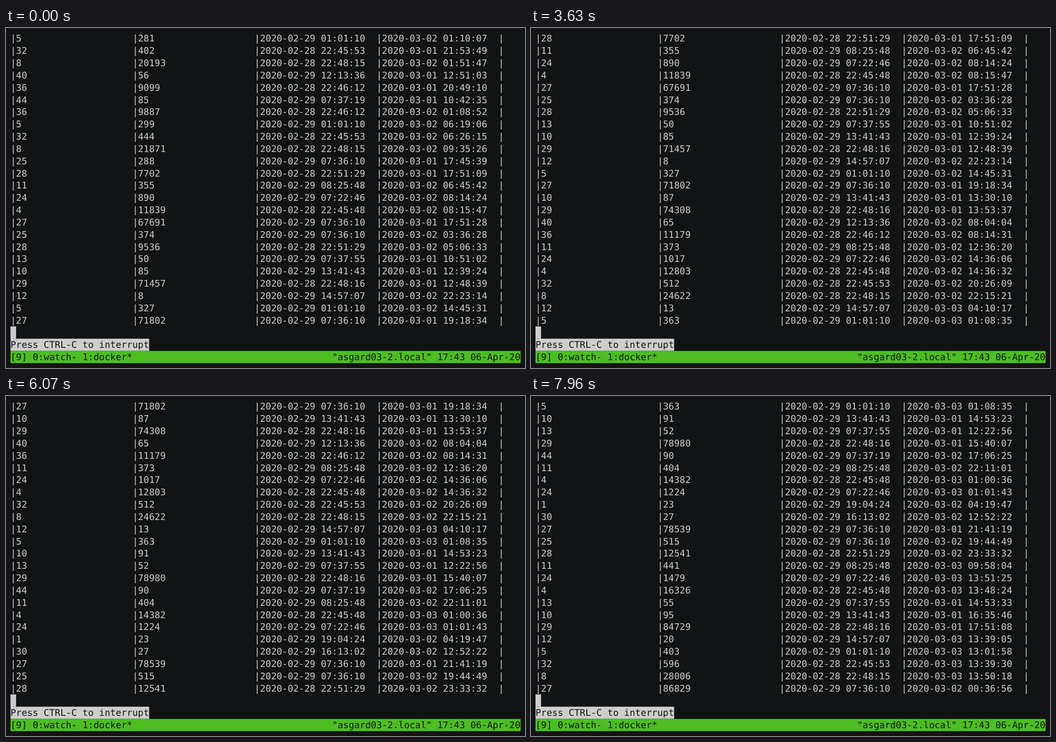
Recreate the animation shown at these times as an HTML page. Size 923 px wide and 606 px high, loop 8000 ms.

```html
<!DOCTYPE html>
<html lang="en">
<head>
<meta charset="utf-8">
<title>Terminal table</title>
<style>
  html, body { margin: 0; width: 100%; height: 100%; overflow: hidden; background: #121314; }
  svg { display: block; }
  text {
    font: 16.377px "DejaVu Sans Mono", "Liberation Mono", monospace;
    text-rendering: geometricPrecision;
    white-space: pre;
    fill: #cdcdca;
  }
  .light { fill: #cdcdcd; }
  .green { fill: #4cbe20; }
  .dark { fill: #121314; }
</style>
</head>
<body>
<svg width="923" height="606" viewBox="0 0 923 606">
  <svg x="0" y="8" width="923" height="524" viewBox="0 8 923 524"><g id="table"></g></svg>
  <g id="footer"></g>
</svg>
<script>
// id: window start in February, first and last count, first and last end in hours of March
const groups = {
  1: ["29 19:04:24", 23, 23, 28.3297, 28.3297],
  4: ["28 22:45:48", 11839, 16326, 32.2631, 61.8067],
  5: ["29 01:01:10", 281, 403, 25.1686, 61.0328],
  8: ["28 22:48:15", 20193, 28006, 25.8631, 61.8383],
  10: ["29 13:41:43", 85, 95, 12.6567, 16.5961],
  11: ["29 08:25:48", 355, 441, 30.7617, 57.9678],
  12: ["29 14:57:07", 8, 20, 46.3872, 61.6514],
  13: ["29 07:37:55", 50, 55, 10.8506, 14.8925],
  24: ["29 07:22:46", 890, 1479, 32.24, 61.8569],
  25: ["29 07:36:10", 288, 515, 17.7608, 43.7469],
  27: ["29 07:36:10", 67691, 86829, 17.8578, 24.6156],
  28: ["28 22:51:29", 7702, 12541, 17.8525, 47.5589],
  29: ["28 22:48:16", 71457, 84729, 12.8108, 17.8522],
  30: ["29 16:13:02", 27, 27, 36.8728, 36.8728],
  32: ["28 22:45:53", 402, 596, 21.8969, 61.6583],
  36: ["28 22:46:12", 9099, 11179, 20.8194, 32.2419],
  40: ["29 12:13:36", 56, 65, 12.8508, 32.0678],
  44: ["29 07:37:19", 85, 90, 10.7097, 41.1069]
};

// ids printed at each time in ms
const batches = {
  0: "5 32 8 40 36 44 36 5 32 8 25 28 11 24 4 27 25 28 13 10 29 12 5 27",
  930: "10 29", 990: "40 36", 1050: "11 24 4", 1110: "32", 1640: "8",
  3100: "12", 3630: "5", 5160: "10 13 29", 5290: "44", 5350: "11 4 24",
  5880: "1", 6010: "30", 6070: "27 25 28", 7400: "11", 7460: "24",
  7520: "4", 7650: "13 10 29", 7710: "12", 7770: "5", 7900: "32 8", 7960: "27"
};

const loop = 8000, screenRows = 24;
const charW = 9.86, lineH = 21.83, pad = 8, ascent = 16.47;
const table = document.getElementById("table");
const footer = document.getElementById("footer");

function add(parent, tag, attrs, content = "") {
  const el = document.createElementNS("http://www.w3.org/2000/svg", tag);
  for (const key in attrs) el.setAttribute(key, attrs[key]);
  el.textContent = content;
  parent.append(el);
}

function print(parent, col, line, content, cls = "") {
  add(parent, "text", { x: pad + col * charW, y: pad + line * lineH + ascent, class: cls }, content);
}

function block(line, cols, cls) {
  add(footer, "rect", { x: pad, y: pad + line * lineH, width: cols * charW, height: lineH, class: cls });
}

const mix = (from, to, k) => from + (to - from) * k;

function stamp(hours) {
  const ms = Date.UTC(2020, 2, 1) + Math.round(hours * 3600) * 1000;
  return new Date(ms).toISOString().slice(0, 19).replace("T", " ");
}

// every repeat of an id moves its count and end time onwards
const ids = Object.values(batches).join(" ").split(" ");
const seen = {};
ids.forEach((id, line) => {
  const [start, count0, count1, end0, end1] = groups[id];
  const repeats = ids.filter(other => other === id).length - 1;
  const n = seen[id] || 0;
  seen[id] = n + 1;
  const k = repeats ? (n / repeats) ** 1.4 : 0;
  const count = Math.round(mix(count0, count1, k));
  const cells = [id, count, "2020-02-" + start, stamp(mix(end0, end1, k)), ""];
  cells.forEach((cell, i) => print(table, i * 22, line, "|" + cell));
});

block(24, 1, "light");
block(25, 25, "light");
block(26, 92, "green");
print(footer, 0, 25, "Press CTRL-C to interrupt", "dark");
print(footer, 0, 26, "[9] 0:watch- 1:docker*", "dark");
print(footer, 58, 26, '"asgard03-2.local" 17:43 06-Apr-20', "dark");

let printed = 0;
const steps = Object.entries(batches).map(([time, list]) => {
  printed += list.split(" ").length;
  return { time: +time, top: printed - screenRows };
});

function draw(t) {
  const { top } = steps.findLast(step => step.time <= t);
  table.setAttribute("transform", `translate(0 ${-top * lineH})`);
}

const begin = performance.now();
function tick() {
  draw((performance.now() - begin) % loop);
  requestAnimationFrame(tick);
}
tick();
</script>
</body>
</html>
```
